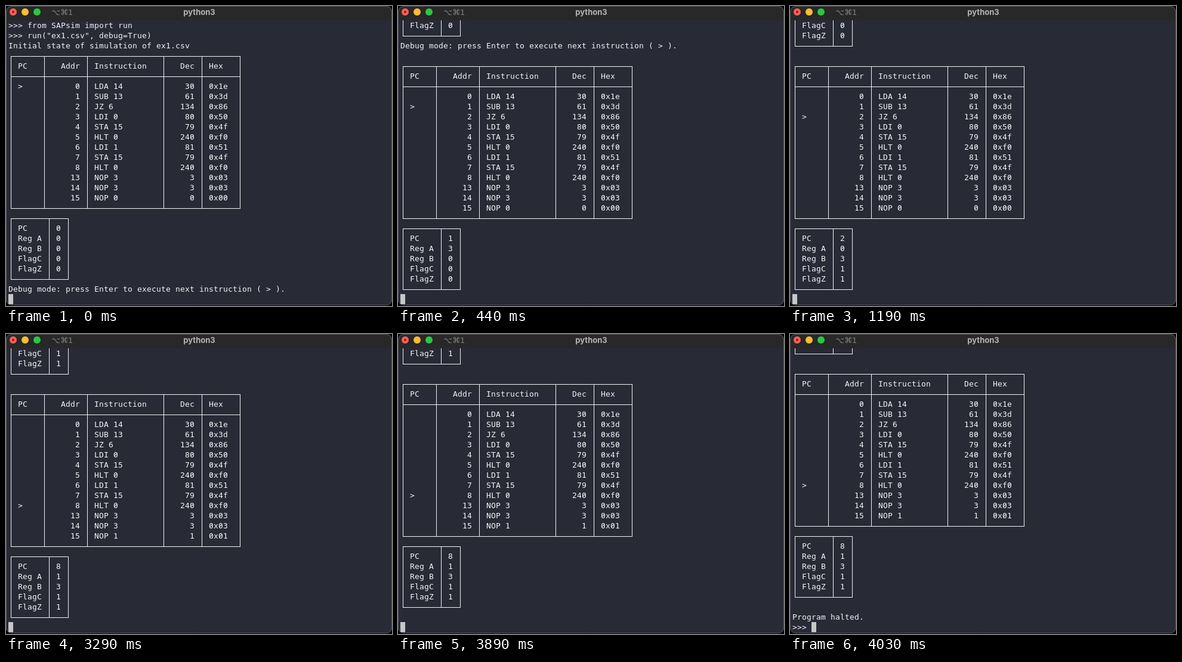
An HTML page with a canvas that plays this animation: 647 by 503 pixels, repeating every 5.23 s.

```html
<!DOCTYPE html>
<html lang="en">
<head>
<meta charset="utf-8">
<title>python3</title>
<style>
html, body { margin: 0; width: 100%; height: 100%; overflow: hidden; background: #000; }
canvas { display: block; width: 647px; height: 503px; }
</style>
</head>
<body>
<canvas id="stage" width="647" height="503"></canvas>
<script>
const W = 647, H = 503, BAR = 24, LEFT = 4, CW = 8, RH = 17;
const LOOP = 5230;
const FG = '#f4f4f4', BG = '#282a36';
const MONO = '13px "DejaVu Sans Mono", monospace';
const ctx = document.getElementById('stage').getContext('2d');

const DEBUG = 'Debug mode: press Enter to execute next instruction ( > ).';
const PROGRAM = [
  [0, 'LDA 14', 30], [1, 'SUB 13', 61], [2, 'JZ 6', 134], [3, 'LDI 0', 80],
  [4, 'STA 15', 79], [5, 'HLT 0', 240], [6, 'LDI 1', 81], [7, 'STA 15', 79],
  [8, 'HLT 0', 240], [13, 'NOP 3', 3], [14, 'NOP 3', 3]
];
const REGS = ['PC', 'Reg A', 'Reg B', 'FlagC', 'FlagZ'];

// regs: PC, A, B, C, Z; top: table row; old: row where the previous registers end
const BOOT = [0, 0, 0, 0, 0], LOADED = [1, 3, 0, 0, 0], EQUAL = [2, 0, 3, 1, 1];
const JUMPED = [6, 0, 3, 1, 1], SET = [7, 1, 3, 1, 1], STORED = [8, 1, 3, 1, 1];
const STEPS = [
  { at: 0, regs: BOOT, top: 3, cursor: 0, lines: {
    0: '>>> from SAPsim import run',
    1: '>>> run("ex1.csv", debug=True)',
    2: 'Initial state of simulation of ex1.csv',
    26: DEBUG } },
  { at: 440, regs: LOADED, prev: BOOT, old: 1, top: 4, cursor: 0, lines: { 2: DEBUG } },
  { at: 1190, regs: EQUAL, prev: LOADED, old: 2, top: 4, cursor: 0 },
  { at: 1940, regs: JUMPED, prev: EQUAL, old: 2, top: 4, cursor: 0 },
  { at: 2540, regs: SET, prev: JUMPED, old: 2, top: 4, cursor: 0 },
  { at: 3290, regs: STORED, prev: SET, old: 2, top: 4, cursor: 0, mem: 1 },
  { at: 3890, regs: STORED, prev: STORED, old: 1, top: 3, cursor: 0, mem: 1 },
  { at: 4030, regs: STORED, prev: STORED, old: 0, top: 2, cursor: 4, mem: 1,
    lines: { 26: 'Program halted.', 27: '>>>' } }
];

const colX = c => LEFT + c * CW;
const rowY = r => BAR + r * RH;

function text(str, col, row) {
  [...String(str)].forEach((ch, i) => {
    const x = colX(col + i), y = rowY(row) + 13;
    ctx.fillText(ch, x, y);
    if (ch === '0') slash(x, y);
  });
}

function slash(x, y) {
  ctx.beginPath();
  ctx.moveTo(x + 2.2, y - 2.2);
  ctx.lineTo(x + 5.7, y - 7.3);
  ctx.stroke();
}

function textEnd(str, col, row) {
  text(str, col + 1 - String(str).length, row);
}

// Grid lines run through the middle of their cells.
function grid(cols, rows) {
  const xs = cols.map(c => colX(c) + 4), ys = rows.map(r => rowY(r) + 9);
  const x0 = xs[0], y0 = ys[0], x1 = xs[xs.length - 1], y1 = ys[ys.length - 1];
  xs.forEach(x => ctx.fillRect(x, y0, 1, y1 - y0 + 1));
  ys.forEach(y => ctx.fillRect(x0, y, x1 - x0 + 1, 1));
}

function tableRow(row, addr, name, dec, hex) {
  textEnd(addr, 14, row);
  text(name, 18, row);
  textEnd(dec, 38, row);
  text(hex, 42, row);
}

function table(top, pc, mem) {
  grid([0, 7, 16, 32, 40, 48], [top, top + 2, top + 15]);
  text('PC', 2, top + 1);
  tableRow(top + 1, 'Addr', 'Instruction', 'Dec', 'Hex');
  [...PROGRAM, [15, 'NOP ' + mem, mem]].forEach(([addr, name, dec], i) => {
    const row = top + 3 + i;
    if (addr === pc) text('>', 2, row);
    tableRow(row, addr, name, dec, '0x' + dec.toString(16).padStart(2, '0'));
  });
}

function registers(top, values) {
  grid([0, 8, 12], [top, top + 6]);
  REGS.forEach((name, i) => {
    text(name, 2, top + 1 + i);
    text(values[i], 10, top + 1 + i);
  });
}

function disc(x, y, r, color) {
  ctx.fillStyle = color;
  ctx.beginPath();
  ctx.arc(x, y, r, 0, Math.PI * 2);
  ctx.fill();
}

function titleBar() {
  ctx.fillStyle = '#282828';
  ctx.fillRect(0, 0, W, BAR);
  ['#ff5f57', '#febc2e', '#28c840'].forEach((c, i) => disc(12 + i * 20, 10, 6, c));
  disc(12, 10, 2, '#8c1a10');
  ctx.fillStyle = '#b6b6b6';
  ctx.textAlign = 'center';
  ctx.font = 'bold 13px Inter, sans-serif';
  ctx.fillText('python3', 324, 15);
  ctx.fillStyle = '#858585';
  ctx.textAlign = 'left';
  ctx.font = '13px "DejaVu Sans", sans-serif';
  ctx.fillText('⌥⌘1', 76, 15);
}

function draw(step) {
  ctx.fillStyle = '#000';
  ctx.fillRect(0, 0, W, H);
  ctx.save();
  ctx.beginPath();
  ctx.roundRect(0, 0, W, H - 1, 9);
  ctx.clip();
  ctx.fillStyle = BG;
  ctx.fillRect(0, 0, W, H);
  titleBar();

  ctx.beginPath();
  ctx.rect(0, BAR, W, H - BAR);
  ctx.clip();
  ctx.font = MONO;
  ctx.fillStyle = ctx.strokeStyle = FG;
  ctx.lineWidth = 0.9;
  for (const [row, line] of Object.entries(step.lines || {})) text(line, 0, +row);
  if (step.prev) registers(step.old - 6, step.prev);
  table(step.top, step.regs[0], step.mem || 0);
  registers(step.top + 16, step.regs);
  ctx.fillStyle = '#c7c7c7';
  ctx.fillRect(colX(step.cursor), rowY(27), CW, RH);
  ctx.restore();

  ctx.strokeStyle = '#55565e';
  ctx.lineWidth = 1;
  ctx.beginPath();
  ctx.roundRect(0.5, 0.5, W - 1, H - 2, 9);
  ctx.stroke();
}

const start = performance.now();
function tick() {
  const t = (performance.now() - start) % LOOP;
  draw(STEPS.findLast(s => s.at <= t));
  requestAnimationFrame(tick);
}
tick();
</script>
</body>
</html>
```
